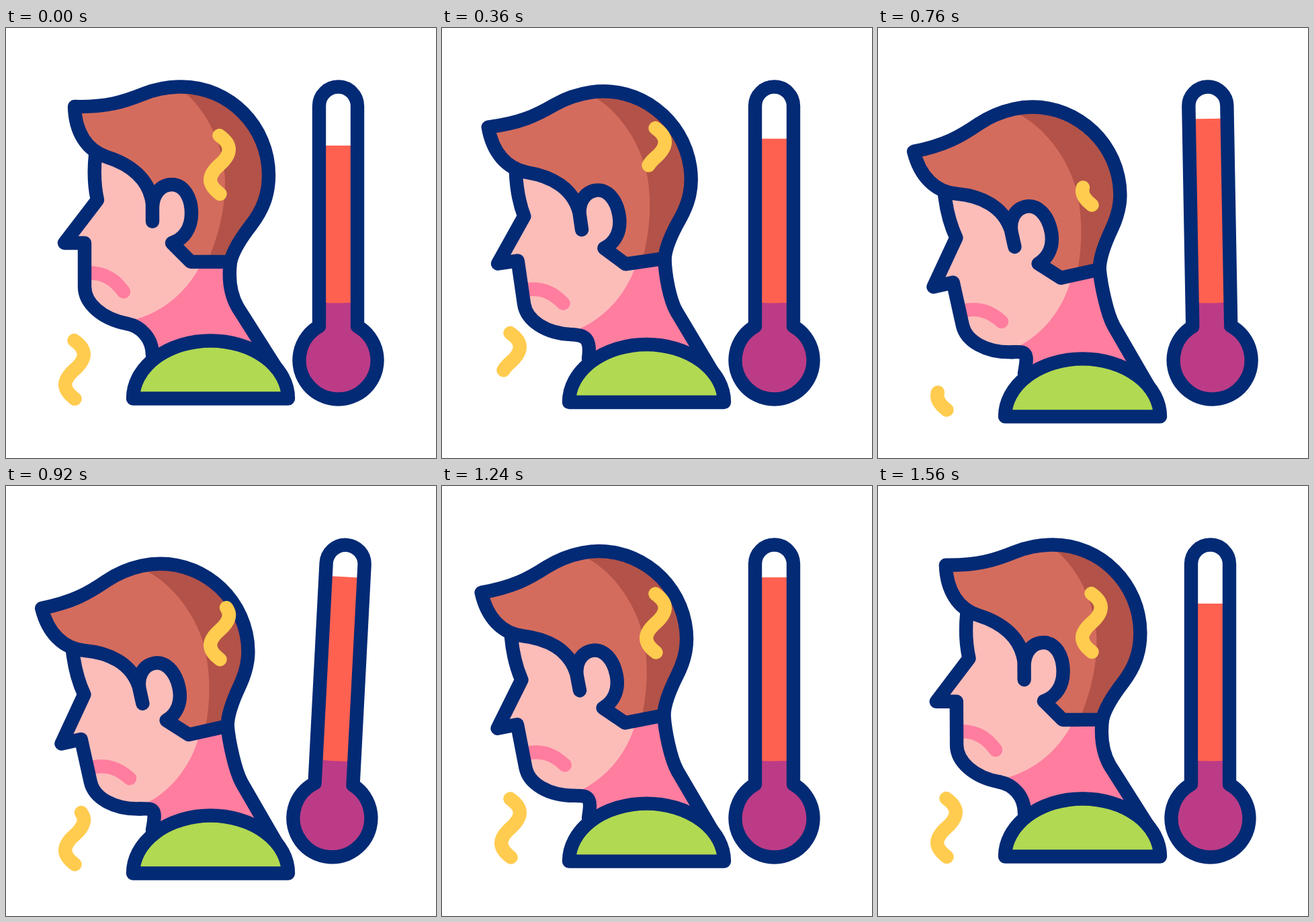
An HTML page that plays this animation: 640 px wide and 640 px high, repeating every 1600 ms.

```html
<!DOCTYPE html>
<html lang="en">
<head>
<meta charset="utf-8">
<title>Fever</title>
<style>
  html, body { margin: 0; height: 100%; overflow: hidden; background: #fff; }
  svg { display: block; width: 100vw; height: 100vh; }
  .line { fill: none; stroke: #032a75; }
</style>
</head>
<body>
<svg viewBox="0 0 640 640" fill="none" stroke-width="20.4" stroke-linecap="round" stroke-linejoin="round">
  <defs>
    <path id="hair" d="M102 117C150 118 175 110 205 98C223 91 242 87.5 261 87.5C333 87.5 391 147 391 219C391 250 381 272 365 293C351 311 338 330 334 348H275L247 320C265 314 276 298 276 276C276 251 264 233 247 233C230 233 218 248 218 268V288V262C214 225 185 203 150 192C120 182 103 155 102 117Z"/>
    <clipPath id="hairClip"><use href="#hair"/></clipPath>
    <path id="squiggle" pathLength="100" d="M317.5 160C337.5 174 335.5 188 318 203.5S298.5 232 318.5 247"/>
  </defs>

  <g id="person">
    <path id="neck" fill="#ff7d9f"/>
    <g id="head">
      <path fill="#fcbdb9" d="M133 188C130 220 132 238 136 256L87 320H117V385C117 410 143 433 180 440L195 433C235 421 270 392 290 352L300 240L200 160Z"/>
      <path stroke="#ff7d9f" d="M122 364.5C148 364 163 376 175 392.5"/>
      <use href="#hair" fill="#d46c5d"/>
      <path clip-path="url(#hairClip)" fill="#b35248" d="M258 90C298 118 325 175 326 228C326 270 317 308 298 352H420V80Z"/>
      <use href="#hair" class="line"/>
      <path class="line" d="M133 190C130 220 132 238 136 256L87 320H117V385C117 410 143 433 180 440"/>
    </g>
    <path id="jaw" class="line"/>
    <path id="nape" class="line"/>
    <path fill="#b1d952" stroke="#032a75" d="M189 551.5A115.5 86 0 0 1 420 551.5Z"/>
  </g>

  <g id="thermometer">
    <path id="mercury" fill="#ff6151"/>
    <path fill="#bc3b86" d="M466 408Q494.5 411 523 408V444A58 58 0 1 1 466 444Z"/>
    <path class="line" d="M466 444V116A28.5 28.5 0 0 1 523 116V444A58 58 0 1 1 466 444Z"/>
  </g>

  <g id="heat" stroke="#ffcc4f">
    <use href="#squiggle"/>
    <use href="#squiggle" x="-216" y="305"/>
  </g>
</svg>
<script>
const LOOP = 1600, STEP = 40, TILT = 12.5;
const PIVOT = [260, 360];
const $ = id => document.getElementById(id);
const mix = (a, b, k) => a + (b - a) * k;

// Smooth 0..1 progress between two times
function ease(t, from, to) {
  const x = Math.min(1, Math.max(0, (t - from) / (to - from)));
  return x * x * (3 - 2 * x);
}

const there = (t, a, b, c, d) => ease(t, a, b) - ease(t, c, d);

const swing = [[560, 0], [680, -6.2], [860, 6.2], [1040, -6.2], [1235, 0]];
function shake(t) {
  let angle = 0;
  for (let i = 1; i < swing.length; i++) {
    angle += (swing[i][1] - swing[i - 1][1]) * ease(t, swing[i - 1][0], swing[i][0]);
  }
  return angle;
}

function drawPerson(t) {
  const nod = there(t, 80, 540, 1140, 1600);
  const sink = 27 * there(t, 190, 780, 815, 1455);
  const a = -TILT * nod * Math.PI / 180, cos = Math.cos(a), sin = Math.sin(a);
  const onHead = (x, y) => {
    const dx = x - PIVOT[0], dy = y - PIVOT[1];
    return [PIVOT[0] + dx * cos - dy * sin, PIVOT[1] + dx * sin + dy * cos];
  };
  const morph = (x0, y0, x1, y1) => [mix(x0, x1, nod), mix(y0, y1, nod)];

  $('person').setAttribute('transform', `translate(0 ${sink})`);
  $('head').setAttribute('transform', `rotate(${-TILT * nod} ${PIVOT})`);

  // Jaw and nape join the tilting head to the shoulders
  const shoulder = [406, 512];
  const napeTop = onHead(334, 348), napeBend = onHead(331, 372);
  const napePull = morph(334, 397, 341, 399), napeEnd = morph(345, 416, 351, 417);
  const jaw = `M${onHead(180, 440)}C${onHead(201, 444)} ${morph(218, 462, 224, 454)} 218 487`;

  $('jaw').setAttribute('d', jaw);
  $('nape').setAttribute('d', `M${napeTop}C${napeBend} ${napePull} ${napeEnd}L${shoulder}`);
  $('neck').setAttribute('d', `${jaw}L${shoulder}L${napeEnd}C${napePull} ${napeBend} ${napeTop}L${onHead(275, 348)}Z`);
}

function drawThermometer(t) {
  const level = 175 - 40 * there(t, 260, 560, 1210, 1510);
  $('thermometer').setAttribute('transform', `rotate(${shake(t)} 494.5 319.5)`);
  $('mercury').setAttribute('d', `M466 ${level}H523V415H466Z`);
}

function drawHeat(t) {
  const leaving = t < 620;
  const start = leaving ? 0 : 100 * (1 - ease(t, 620, 1010));
  const end = leaving ? 100 * (1 - ease(t, 200, 600)) : 100;
  const y = leaving ? -22 * ease(t, 100, 620) : 18 * (1 - ease(t, 640, 1310));
  const heat = $('heat');
  heat.setAttribute('transform', `translate(0 ${y})`);
  heat.setAttribute('visibility', end - start > 0.5 ? 'visible' : 'hidden');
  heat.setAttribute('stroke-dasharray', `${end - start} 300`);
  heat.setAttribute('stroke-dashoffset', -start);
}

function frame() {
  const t = Math.floor(performance.now() % LOOP / STEP) * STEP;
  drawPerson(t);
  drawThermometer(t);
  drawHeat(t);
  requestAnimationFrame(frame);
}
frame();
</script>
</body>
</html>
```
